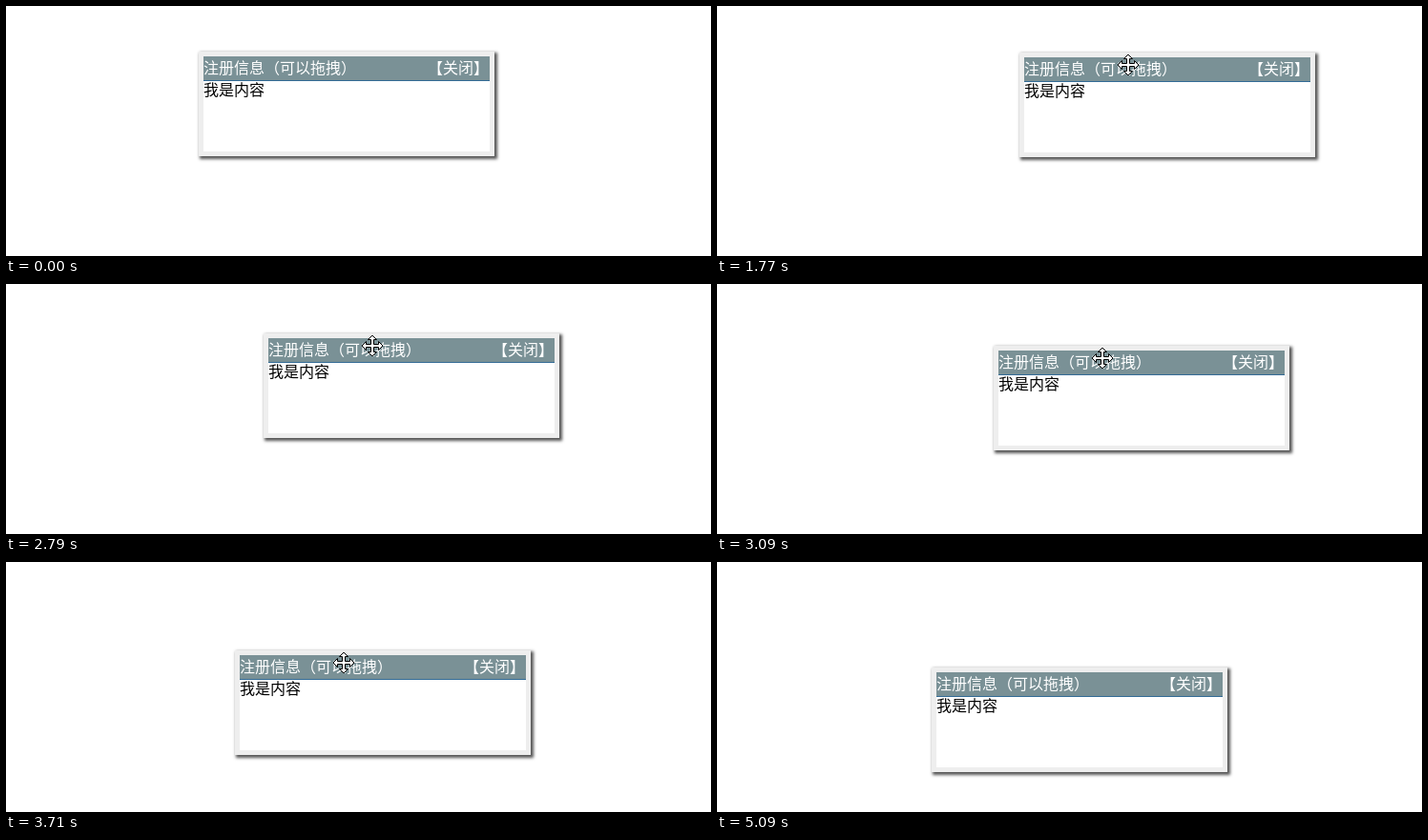
An HTML page that plays this animation: 739x263 px, repeating every 5.64 s.

```html
<!DOCTYPE html>
<html lang="zh">
<head>
<meta charset="utf-8">
<style>
  html, body { margin: 0; width: 100%; height: 100%; overflow: hidden; background: #fff; }
  body { position: relative; font: 16px/16px "Noto Sans CJK SC", "Noto Sans CJK", sans-serif; }
  #dialog {
    position: absolute; left: 0; top: 0; width: 300px; height: 100px;
    border: 5px solid #eee; background: #fff; color: #000;
    box-shadow: 2px 2px 3px 1px #555;
  }
  #bar {
    display: flex; justify-content: space-between; height: 25px; line-height: 23px;
    padding-right: 1px; background: #7a9196; color: #fff;
    border-bottom: 1px solid #336b96; white-space: nowrap;
  }
  #pointer { position: absolute; left: 0; top: 0; overflow: visible; }
  #pointer path { fill: #fff; stroke: #000; }
</style>
</head>
<body>
<div id="dialog">
  <div id="bar"><span>注册信息（可以拖拽）</span><span>【关闭】</span></div>
  <div>我是内容</div>
</div>
<svg id="pointer" width="1" height="1">
  <path id="arrow" d="M.5 .5V16.5L4 13 6.5 18.5 9 17.5 6.5 12H11.5Z"/>
  <path id="move" d="M0-11L4.5-6.5H1.5V-1.5H6.5V-4.5L11 0 6.5 4.5V1.5H1.5V6.5H4.5L0 11-4.5 6.5H-1.5V1.5H-6.5V4.5L-11 0-6.5-4.5V-1.5H-1.5V-6.5H-4.5Z"/>
</svg>
<script>
const LOOP = 5640, UPDATE = 77.2, SLACK = 11;
const ENTER = 450, GRAB = 990, RELEASE = 4500, LEAVE = 5090;
const [dialog, pointer, arrow, move] =
  ["dialog", "pointer", "arrow", "move"].map(id => document.getElementById(id));

// The screen updates evenly during these spans and stands still between them
const spans = [[ENTER, GRAB], [1240, 2940], [3090, 3940], [4170, LEAVE]];

// Turning points of the drag: time, left, top
const turns = [
  [1000, 202, 48], [1120, 202, 50], [1907, 325, 49], [2485, 120, 44], [2953, 331, 57],
  [3400, 141, 84], [3770, 247, 95], [3940, 178, 109], [RELEASE, 225, 111]
];

const swing = p => (1 - Math.cos(Math.PI * p)) / 2;
const mix = (a, b, p) => Math.round(a + (b - a) * p);
const curve = (a, b, c, p) =>
  a.map((_, i) => Math.round(a[i] * (1 - p) ** 2 + 2 * b[i] * p * (1 - p) + c[i] * p * p));

function lastUpdate(time) {
  const span = spans.filter(([start]) => start <= time).pop();
  if (!span) return 0;
  const [start, end] = span;
  return Math.min(end, start + UPDATE * Math.floor((time - start + SLACK) / UPDATE));
}

function dialogAt(time) {
  const t = Math.min(Math.max(time, turns[0][0]), RELEASE);
  const next = turns.findIndex(turn => turn[0] >= t) || 1;
  const [t0, x0, y0] = turns[next - 1], [t1, x1, y1] = turns[next];
  const p = (t - t0) / (t1 - t0);
  return [mix(x0, x1, swing(p)), mix(y0, y1, p)];
}

function pointerAt(time, x, y) {
  if (time < GRAB)
    return curve([521, 130], [380, -22], [316, 62], (time - ENTER) / (GRAB - ENTER));
  if (time > RELEASE)
    return curve([339, 124], [621, 164], [722, 270], (time - RELEASE) / (LEAVE - RELEASE));
  return [x + 114, y + 13];
}

const place = (element, x, y) => element.style.transform = `translate(${x}px, ${y}px)`;
const show = (element, visible) => element.style.display = visible ? "inline" : "none";

function draw() {
  const time = lastUpdate(performance.now() % LOOP);
  const [x, y] = dialogAt(time);
  const [px, py] = pointerAt(time, x, y);
  const onBar = px >= x + 5 && px < x + 305 && py >= y + 5 && py < y + 31;

  place(dialog, x, y);
  place(pointer, px, py);
  show(pointer, time >= ENTER && time < LEAVE);
  show(move, onBar);
  show(arrow, !onBar);
  requestAnimationFrame(draw);
}
draw();
</script>
</body>
</html>
```
